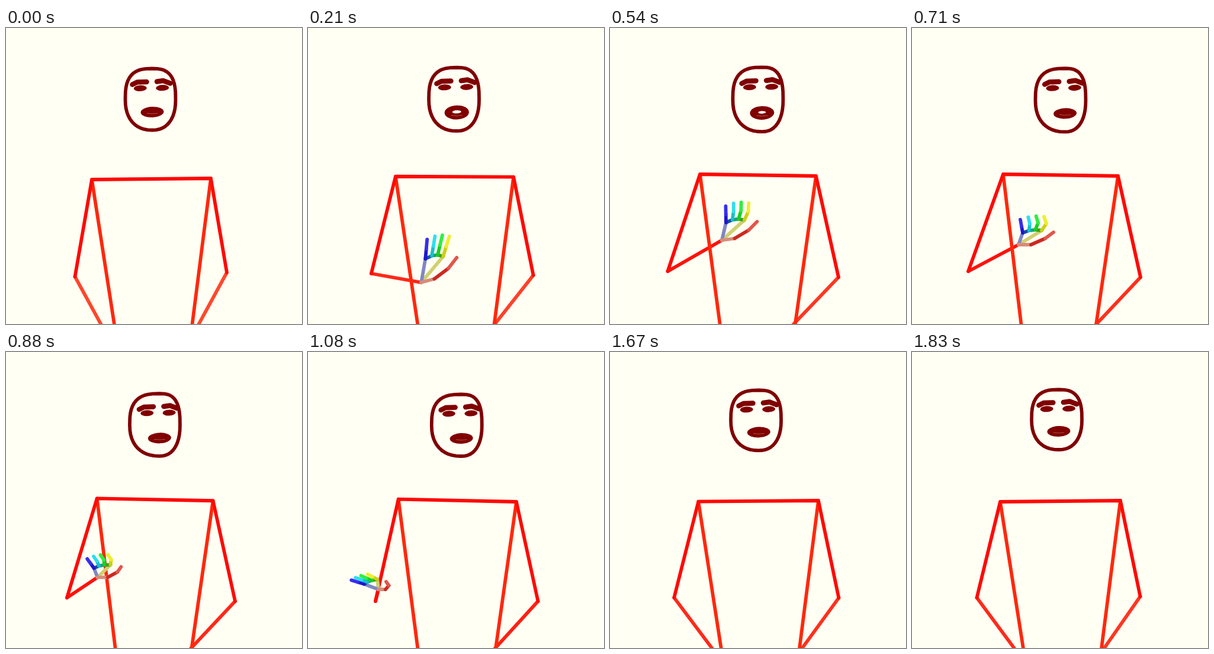
An HTML page with a canvas for the animation above (1870 ms loop, 500 px wide and 500 px high).

```html
<!DOCTYPE html>
<html>
<head>
<meta charset="utf-8">
<style>
html, body { margin: 0; width: 100%; height: 100%; overflow: hidden; background: #fffff4; }
canvas { display: block; width: 500px; height: 500px; }
</style>
</head>
<body>
<canvas id="stage" width="500" height="500"></canvas>
<script>
const ctx = document.getElementById('stage').getContext('2d');
const LOOP = 1870, FPS = 24, LAST = 44;
const DARK = '#800000', PAPER = '#fffff4', THICK = 5.8;

// Hand poses, relative to the wrist: palm is the middle of the knuckles,
// across runs from there to the index knuckle, reach to the fingertips
const raised = { palm: [22, -42], across: [15, -2], reach: [7, -35], thumb: [22, -6], tip: [60, -42] };
const cupped = { palm: [23, -22], across: [16, -2], reach: [0, -24], thumb: [21, 0], tip: [59, -21] };
const swept = { palm: [-13, -13], across: [11, -4], reach: [-20, -8], thumb: [12, 0], tip: [13, -13] };
const curled = { palm: [27, 7], across: [14, -11], reach: [3, 14], thumb: [16, -8], tip: [57, 16] };

// Little, ring, middle, index: hues
const FINGERS = [242, 185, 125, 60];

const mix = (a, b, k) => a.map((v, i) => v + (b[i] - v) * k);
const add = (a, b, k = 1) => a.map((v, i) => v + b[i] * k);

// Progress of every phase at step f
function phases(f) {
  const ease = (a, b) => {
    const u = Math.min(1, Math.max(0, (f - a) / (b - a)));
    return u * u * (3 - 2 * u);
  };
  return {
    raise: ease(0, 9), pull: ease(9, 17), sweep: ease(17, 26),
    curl: ease(26, 33), drop: ease(33, 40), nod: ease(9, 26),
    lift: ease(26, 44), recover: ease(17, 44), end: ease(33, 44),
    sway: Math.sin(Math.PI * f / 45)
  };
}

function trace(pts, closed) {
  ctx.beginPath();
  pts.forEach(([x, y], i) => i ? ctx.lineTo(x, y) : ctx.moveTo(x, y));
  if (closed) ctx.closePath();
}

function line(color, width, ...pts) {
  trace(pts);
  ctx.strokeStyle = color;
  ctx.lineWidth = width;
  ctx.stroke();
}

function oval(x, y, rx, ry, color) {
  ctx.beginPath();
  ctx.ellipse(x, y, rx, ry, -0.04, 0, Math.PI * 2);
  ctx.fillStyle = color;
  ctx.fill();
}

function drawBody(p, wrist) {
  const { raise, pull, sweep, curl, drop, recover, end } = p;
  const shoulderR = [145 + 5 * raise + 4 * pull - 5 * recover, 256 - 9 * raise + 6 * recover];
  const shoulderL = [346 + 2 * raise + 4 * sweep, 254 - 4 * raise + 3 * sweep - 2 * drop];
  const elbowR = [116.5 - 16.5 * raise - 5 * pull + 19 * sweep - 8.5 * curl + 4 * end,
    420 - 9 * raise + 10 * sweep - 6 * drop];
  const elbowL = [373 + 13 * raise + 2.5 * sweep - 3 * end, 413 + 8 * raise - 8 * end];
  const hipR = [183 + 4 * raise - 2.5 * pull + 3.5 * recover, 501];
  const hipL = [314.5 - 3.5 * pull + 6 * sweep + 3 * drop, 501];
  const wristL = [304 - 34 * raise + 4 * pull + 23 * recover, 540];
  const red = v => `rgb(255,${Math.round(v)},${Math.round(v * .6)})`;

  line(red(70 - 52 * raise + 25 * drop), THICK, elbowR, wrist);
  line(red(72 - 10 * raise - 15 * pull - 15 * sweep + 23 * end), THICK, elbowL, wristL);
  line('#ff280c', THICK, shoulderR, hipR);
  line('#ff280c', THICK, shoulderL, hipL);
  line('#ff0a04', THICK, elbowR, shoulderR, shoulderL, elbowL);
}

// Rounded egg: squarer above, narrower below; turning slides the middle sideways
function outline(cx, cy, rx, ry, turn) {
  const pts = [];
  for (let i = 0; i < 48; i++) {
    const a = i / 48 * Math.PI * 2, c = Math.cos(a), s = Math.sin(a);
    const power = 2 / (s < 0 ? 2.8 : 2.3);
    const x = Math.sign(c) * Math.abs(c) ** power, y = Math.sign(s) * Math.abs(s) ** power;
    pts.push([cx + rx * x + turn * (1 - Math.abs(x)), cy + ry * y]);
  }
  return pts;
}

function drawFace({ raise, pull, nod, lift, sway }) {
  const x = 244 + 7.5 * sway, turn = 3 + 5 * sway;
  const top = 68.5 - 3 * raise + 6 * nod - 8 * lift;
  const chin = 172.5 + 2.5 * raise + nod - 11 * lift;
  trace(outline(x, (top + chin) / 2, 42.5, (chin - top) / 2, turn), true);
  ctx.strokeStyle = DARK;
  ctx.lineWidth = THICK;
  ctx.stroke();

  const eyes = [x + 1.5 + 4 * sway, 101.5 - 2.5 * raise + 5 * nod - 8 * lift];
  const at = (dx, dy) => add(eyes, [dx, dy]);
  line(DARK, 8.5, at(-32, -6), at(-24, -10), at(-8, -10.5));
  line(DARK, 8.5, at(9.5, -11), at(20, -12.5), at(32, -8));
  oval(...at(-18.7, .3), 11, 5, DARK);
  oval(...at(18.7, -.4), 11, 5, DARK);

  const mx = x + turn, my = 142 + raise + 3 * nod - 12 * lift;
  const open = raise * (1 - pull);
  oval(mx, my, 19.5 + 2 * open, 9 + 5 * open, DARK);
  oval(mx, my - 1, 13 * open, 4.5 * open, PAPER);
  const low = my + 3 + 5 * open;
  line('#a85848', 1, [mx - 9, low - 1], [mx, low], [mx + 9, low - 1]);
}

function drawHand({ pull, sweep, curl }, wrist) {
  if (wrist[1] > 520) return;
  const hand = {};
  for (const key in raised) {
    const v = mix(mix(mix(raised[key], cupped[key], pull), swept[key], sweep), curled[key], curl);
    hand[key] = v;
  }
  const { across, reach } = hand;
  const palm = add(wrist, hand.palm), thumb = add(wrist, hand.thumb), tip = add(wrist, hand.tip);
  const fingers = FINGERS.map((hue, i) => {
    const k = i / 1.5 - 1, arch = .12 * (1 - k * k);
    const base = add(add(palm, across, k), reach, arch);
    const end = add(add(palm, across, 1.25 * k), reach, .95 + arch);
    const mid = add(mix(base, end, .5), [i * 2 * (pull - sweep + curl), 0]);
    return { hue, base, mid, end };
  });

  line('#d0d070', THICK, wrist, fingers[3].base);
  line('#8088c4', THICK, wrist, fingers[0].base);
  line('#d88c78', THICK, wrist, thumb);
  const joint = add(mix(thumb, tip, .5), [5, 0]);
  line('#cc2a20', THICK, thumb, joint);
  line('#e2564a', THICK, joint, tip);
  fingers.slice(1).forEach((g, i) => line(`hsl(${215 - 55 * i},75%,36%)`, THICK, fingers[i].base, g.base));
  for (const { hue, base, mid, end } of fingers) {
    line(`hsl(${hue},80%,45%)`, THICK, base, mid);
    line(`hsl(${hue},85%,56%)`, THICK, mid, end);
  }
}

function draw(ms) {
  const f = Math.min(LAST, Math.floor((ms % LOOP + 5) * FPS / 1000));
  const p = phases(f);
  const wrist = [
    182 + 16 * p.raise - 18 * p.pull - 61 * p.sweep - 12 * p.curl + 95 * p.drop,
    540 - 189 * p.raise + 15 * p.pull + 35 * p.sweep - p.curl + 140 * p.drop
  ];
  ctx.fillStyle = PAPER;
  ctx.fillRect(0, 0, 500, 500);
  ctx.lineCap = ctx.lineJoin = 'round';
  drawBody(p, wrist);
  drawFace(p);
  drawHand(p, wrist);
}

let start;
function tick(now) {
  if (start === undefined) start = now;
  draw(Math.max(0, now - start));
  requestAnimationFrame(tick);
}
draw(0);
requestAnimationFrame(tick);
</script>
</body>
</html>
```
